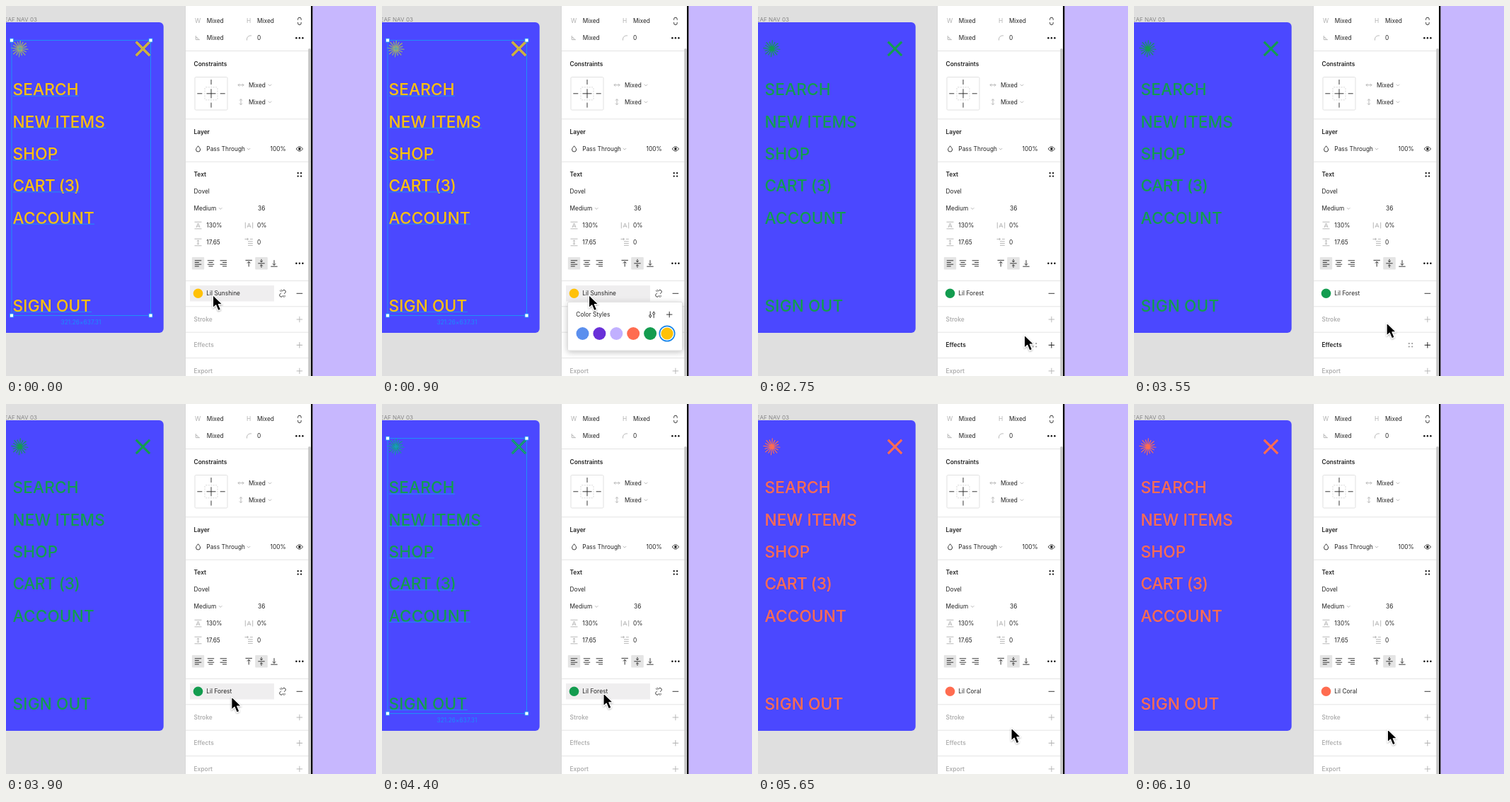
An HTML page for the animation above (6800 ms loop, 523 by 523 pixels).

```html
<!DOCTYPE html>
<html lang="en">
<head>
<meta charset="utf-8">
<title>Color styles</title>
<style>
html, body { margin: 0; width: 100%; height: 100%; overflow: hidden; background: #dfdfdf; }
svg { display: block; width: 100vw; height: 100vh; }
text { font: 400 8.3px Inter, "Liberation Sans", sans-serif; letter-spacing: .04px; fill: #222; }
text.b { font-weight: 600; }
text.g { fill: #b0b0b0; }
#menu text { font-size: 22.6px; font-weight: 500; letter-spacing: .15px; fill: inherit; }
.i { fill: none; stroke: #222; stroke-width: .9; }
.d { fill: none; stroke: #b0b0b0; stroke-width: .9; }
.s { fill: none; stroke: #1b98f5; stroke-width: .9; }
.rule { stroke: #e4e4e4; stroke-width: 1; }
</style>
</head>
<body>
<svg id="stage" viewBox="0 0 523 523">
  <defs>
    <filter id="soft" x="-20%" y="-40%" width="140%" height="190%">
      <feDropShadow dx="0" dy="2" stdDeviation="4" flood-color="#000" flood-opacity=".25"/>
    </filter>
    <filter id="drop" x="-50%" y="-30%" width="220%" height="180%">
      <feDropShadow dx="0" dy="1" stdDeviation="1" flood-color="#000" flood-opacity=".35"/>
    </filter>
  </defs>
  <rect width="523" height="523" fill="#dfdfdf"/>
  <rect x="-20" y="23" width="242.7" height="439" rx="6" fill="#4b48ff"/>
  <text x="44" y="21.6" text-anchor="end" style="font-size:8px;fill:#858585">LEAF NAV 03</text>
  <g id="menu"></g>
  <g id="selection"></g>
  <rect x="253.5" width="178" height="523" fill="#fff"/>
  <path d="M253.5 0V523" stroke="#d4d4d4" stroke-width=".8"/>
  <g id="panel"></g>
  <g id="fillRow">
    <rect id="hover" x="260" y="395" height="22.5" fill="#efeeef"/>
    <circle id="swatch" cx="271.5" cy="406.3" r="6.8"/>
    <text id="styleName" x="283.3" y="409.4"></text>
    <g id="unlink" class="i">
      <path d="M389.8 403.6l1.5-1.5a2.3 2.3 0 0 1 3.3 3.3l-1.5 1.5M392.2 409l-1.5 1.5a2.3 2.3 0 0 1-3.3-3.3l1.5-1.5M387 402.3l1.5 1.2M388.9 400.8l.6 1.6M395 410.4l-1.5-1.2M393.1 411.9l-.6-1.6"/>
    </g>
    <path class="i" d="M410.6 406.3h8.6"/>
  </g>
  <g id="effects">
    <text class="b" x="265.5" y="482.3">Effects</text>
    <path d="M410.7 479.3h8.4M414.9 475.1v8.4" fill="none"/>
    <g id="effectDots" fill="#999"></g>
  </g>
  <rect x="427.3" y="60" width="3.3" height="470" rx="1.6" fill="#c3c3c3"/>
  <rect x="431" width="2.6" height="523" fill="#0a0a0a"/>
  <rect x="433.6" width="90" height="523" fill="#c7b7fe"/>
  <g id="popup">
    <rect x="262.5" y="418.5" width="162" height="68.5" rx="1.5" fill="#fff" stroke="#cfcfcf" stroke-width=".6" filter="url(#soft)"/>
    <text x="274.3" y="439.2">Color Styles</text>
    <path class="i" d="M379.2 431.5v5M379.2 439.5v1.6M384.2 431.5v1.6M384.2 436.3v4.8M402 436.1h8.4M406.2 431.9v8.4"/>
    <g class="i"><circle cx="379.2" cy="438" r="1.5"/><circle cx="384.2" cy="434.6" r="1.5"/></g>
    <g id="chips"></g>
    <circle id="ring" cy="463" r="10.7" fill="none" stroke="#1a86e8" stroke-width="1.7"/>
  </g>
  <g id="cursor" filter="url(#drop)">
    <path d="M0 0V18.2L4.2 14.3L7.4 22L11 20.5L7.8 13H13.4Z" fill="#000" stroke="#fff" stroke-width="1.1" stroke-linejoin="round"/>
  </g>
</svg>
<script>
const LOOP = 6800, STEP = 50;
const $ = id => document.getElementById(id);
const show = (el, on) => el.setAttribute('display', on ? 'inline' : 'none');
const text = (x, y, s, c = '') => `<text x="${x}" y="${y + 3}" class="${c}">${s}</text>`;
const path = (d, c = 'i') => `<path class="${c}" d="${d}"/>`;
const dot = (x, y, r = 1.1) => `<circle cx="${x}" cy="${y}" r="${r}"/>`;
const dots = (x, y) => [-4.5, 0, 4.5].map(d => dot(x + d, y, 1.2)).join('');
const quad = (x, y) => [[-2.2, -2.2], [2.2, -2.2], [-2.2, 2.2], [2.2, 2.2]].map(([a, b]) => dot(x + a, y + b)).join('');
const chevron = (x, y) => path(`M${x - 2.2} ${y - 1}l2.2 2.2l2.2 -2.2`, 'd');
const plus = (x, y) => path(`M${x - 4.2} ${y}h8.4M${x} ${y - 4.2}v8.4`, 'd');

// Navigation card: label, baseline, right end
const items = [
  ['SEARCH', 126.4, 103], ['NEW ITEMS', 171.7, 141], ['SHOP', 217, 74],
  ['CART (3)', 262.2, 104], ['ACCOUNT', 307.5, 125], ['SIGN OUT', 431.7, 121]
];
const cross = 'M183.8 50.7L203.2 70.1M203.2 50.7L183.8 70.1';
let rays = '';
for (let k = 0; k < 16; k++) {
  const a = k * Math.PI / 8 + .08, r = k % 2 ? 10.3 : 12;
  rays += `M19.4 60.3L${19.4 + r * Math.cos(a)} ${60.3 + r * Math.sin(a)}`;
}
$('menu').innerHTML = items.map(([s, y]) => {
  const tight = s.includes('(') ? ' style="letter-spacing:-.45px"' : '';
  return `<text x="9.6" y="${y}"${tight}>${s}</text>`;
}).join('') +
  `<path d="${cross}" stroke-width="3.1"/><path d="${rays}" stroke-width="1.15"/>`;

const handle = (x, y) => `<rect x="${x - 2.5}" y="${y - 2.5}" width="5" height="5" fill="#fff" stroke="#1b98f5" stroke-width=".8"/>`;
$('selection').innerHTML =
  items.map(([, y, end]) => path(`M10 ${y + .7}H${end}`, 's')).join('') +
  `<g opacity=".7">${path(rays, 's')}${path(cross, 's')}</g>` +
  '<rect class="s" x="8" y="48.5" width="196.5" height="389"/>' +
  [[8, 48.5], [204.5, 48.5], [8, 437.5], [204.5, 437.5]].map(p => handle(...p)).join('') +
  '<text x="106" y="450.3" text-anchor="middle" style="fill:#1b8dfb">321.26×637.31</text>';

// Property panel
const align = (x, shift) => [-4, -1.3, 1.4, 4.1].map((dy, k) => {
  const w = k % 2 ? 6 : 9.4;
  return `M${x - 4.7 + (9.4 - w) * shift} ${363.8 + dy}h${w}`;
}).join('');
const rules = [63.5, 159.8, 220.2, 388.4, 424.8, 461.2, 497.6];
$('panel').innerHTML =
  rules.map(y => path(`M254 ${y}H431`, 'rule')).join('') +
  // size and rotation
  text(283.7, -2.6, 'Mixed') + text(355, -2.6, 'Mixed') +
  text(267, 21.4, 'W', 'g') + text(283.7, 21.4, 'Mixed') + text(340, 21.4, 'H', 'g') + text(355, 21.4, 'Mixed') +
  path('M412.6 19.8v-1.3a2.3 2.3 0 0 1 4.6 0v1.3M412.6 23v1.3a2.3 2.3 0 0 0 4.6 0v-1.3') +
  path('M268.3 42v5.6h5.6M268.3 44.2a3.4 3.4 0 0 1 3.4 3.4M340.5 48.5v-1.6a5 5 0 0 1 5-5h1.5', 'd') +
  text(283.7, 45.4, 'Mixed') + text(355, 45.4, '0') + dots(414.9, 45.3) +
  // constraints
  text(265.5, 82, 'Constraints', 'b') +
  '<rect x="267" y="100.5" width="46" height="46.5" rx="1.5" fill="#fff" stroke="#dedede" stroke-width=".9"/>' +
  '<rect x="281" y="114.8" width="18" height="18" rx="1.5" fill="none" stroke="#cfcfcf" stroke-width=".8" stroke-dasharray="2 1.4"/>' +
  path('M283.5 123.8h13M290 117.3v13M290 104v7M290 136.6v7M270.3 123.8h7M302.7 123.8h7') +
  path('M328 111.7h8M330 109.7l-2 2l2 2M334 109.7l2 2l-2 2M332 131.6v8M330 133.6l2-2l2 2M330 137.6l2 2l2-2', 'd') +
  text(343, 111.7, 'Mixed') + chevron(373, 111.7) + text(343, 135.6, 'Mixed') + chevron(373, 135.6) +
  // layer
  text(265.5, 178, 'Layer', 'b') +
  path('M271.6 197.8c1.4 2 3 3.4 3 5.2a3 3 0 0 1-6 0c0-1.8 1.6-3.2 3-5.2z') +
  text(283.3, 202, 'Pass Through') + chevron(343, 202) + text(373.5, 202, '100%') +
  path('M410.2 202q4.7-6.4 9.4 0q-4.7 6.4-9.4 0z') + dot(414.9, 202, 1.7) +
  // text
  text(265.5, 238.4, 'Text', 'b') + quad(414.9, 238.4) +
  text(265.5, 262.4, 'Dovel') + text(265.5, 286.2, 'Medium') + chevron(303.2, 286.2) + text(356, 286.2, '36') +
  path('M266.5 305.3h10M266.5 314.9h10M269 313l2.5-6l2.5 6M269.8 311.2h3.4M338.3 305.8v8.6M348.7 305.8v8.6M341 313l2.5-6l2.5 6M341.8 311.2h3.4', 'd') +
  text(283.3, 310.2, '130%') + text(355, 310.2, '0%') +
  path('M266.5 329.2h10M266.5 338.8h10M271.5 331v6M270 332.4l1.5-1.5l1.5 1.5M270 335.6l1.5 1.5l1.5-1.5M337.5 329.5h5M340.8 327.8l1.8 1.7l-1.8 1.7M342 332.7h6.8M342 335.5h6.8M342 338.3h6.8M345 329.5h3.8', 'd') +
  text(283.3, 334, '17.65') + text(355, 334, '0') +
  '<rect x="262.8" y="355" width="17.4" height="17.6" rx="1" fill="#e4e4e4"/><rect x="352.2" y="355" width="17.6" height="17.6" rx="1" fill="#e4e4e4"/>' +
  path(align(271.5, 0) + align(289.5, .5) + align(307.3, 1)) +
  path('M338.5 359.4h9.4M343.2 368.5v-7.2M341 363.5l2.2-2.2l2.2 2.2') +
  path('M356.3 363.8h9.4M361 357.8v4M359.2 360.2l1.8 1.8l1.8-1.8M361 369.8v-4M359.2 367.4l1.8-1.8l1.8 1.8') +
  path('M374.3 368.2h9.4M379 359.2v7.2M376.8 364.2l2.2 2.2l2.2-2.2') + dots(414.9, 363.8) +
  text(265.5, 443, 'Stroke', 'b g') + plus(414.9, 443) +
  text(265.5, 515.9, 'Export', 'b g') + plus(414.9, 515.9);
$('effectDots').innerHTML = quad(391, 479.3);

const chips = ['#5b8fee', '#6930d8', '#c1b0ff', '#ff6c50', '#139c4f', '#ffc107'];
const chipX = k => 283.5 + k * 23.9;
$('chips').innerHTML = chips.map((c, k) => `<circle cx="${chipX(k)}" cy="463" r="9" fill="${c}"/>`).join('');

const styles = { sun: ['Lil Sunshine', 5], forest: ['Lil Forest', 4], coral: ['Lil Coral', 3] };

// Cursor tip: start, end, target, easing
const inOut = p => p < .5 ? 2 * p * p : 1 - 2 * (1 - p) ** 2;
const out = p => 1 - (1 - p) ** 2;
const home = [292.5, 408.5];
const moves = [
  [1600, 2300, [376.5, 465], inOut],
  [3440, 4100, [313, 408.8], out],
  [4850, 5150, [358, 457.8], inOut],
  [5650, 6100, [358.4, 459.8], inOut]
];
function tip(t) {
  let at = home;
  for (const [a, b, to, ease] of moves) {
    if (t <= a) break;
    const p = ease(Math.min(1, (t - a) / (b - a)));
    at = at.map((v, k) => v + (to[k] - v) * p);
  }
  return at;
}

const within = (t, a, b) => t >= a && t < b;

function draw(t) {
  const [name, chip] = styles[t < 2750 ? 'sun' : t < 5650 ? 'forest' : 'coral'];
  const color = chips[chip];
  const open = within(t, 900, 2750) || within(t, 4600, 5650);
  const [x, y] = tip(t);
  const inMenu = open && y > 418;
  const hover = open || y < 424.8;

  $('menu').setAttribute('fill', color);
  $('menu').setAttribute('stroke', 'none');
  $('menu').querySelectorAll('path').forEach(p => p.setAttribute('stroke', color));
  show($('selection'), t < 2750 || within(t, 4200, 5650));

  show($('hover'), hover);
  $('hover').setAttribute('width', inMenu ? 143 : 119);
  show($('unlink'), hover && !inMenu);
  $('swatch').setAttribute('fill', color);
  $('styleName').textContent = name;

  const lit = !open && tip(t - 100)[1] > 461.2;
  const [label, sign] = $('effects').children;
  label.style.fill = lit ? '#222' : '#b0b0b0';
  sign.setAttribute('stroke', lit ? '#222' : '#b0b0b0');
  show($('effectDots'), lit);

  show($('popup'), open);
  [...$('chips').children].forEach((c, k) => c.setAttribute('r', k === chip ? 8.6 : 9));
  $('ring').setAttribute('cx', chipX(chip));
  $('cursor').setAttribute('transform', `translate(${x} ${y})`);
}

const start = performance.now();
function tick() {
  const t = (performance.now() - start) % LOOP;
  draw(Math.floor(t / STEP) * STEP);
  requestAnimationFrame(tick);
}
tick();
</script>
</body>
</html>
```
